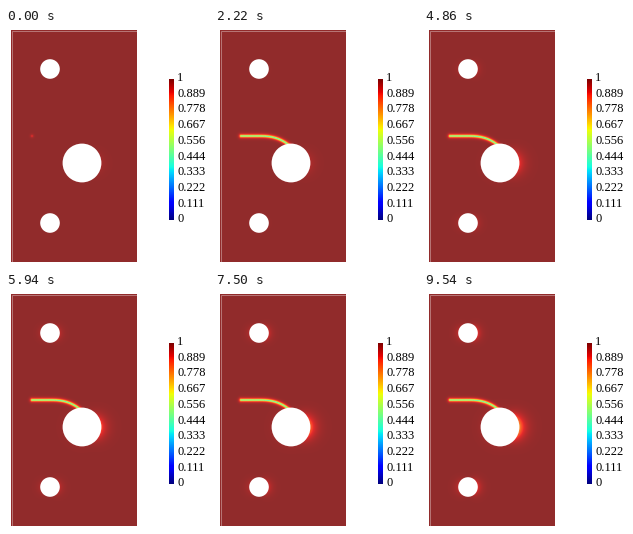
These frames come from a looping animation (203x236 px, 9600 ms). A matplotlib script:

```python
import numpy as np
import matplotlib.pyplot as plt
from matplotlib.animation import FuncAnimation
from matplotlib.patches import Circle, Rectangle

W, H, DPI = 203, 236, 64
STEP, LOOP = 60, 9600
SS = 3  # samples per pixel side
X0, X1, Y0, Y1 = 5, 131, 2, 234  # plate
HOLES = [(44, 41, 9.8), (76, 135, 19.4), (44, 195, 9.8)]
TIP, BEND, GOAL = 26, 44, (74.5, 117.5)  # crack start, bend and end
CRACK_Y = 108
CRACK_TIME, LOAD_START = 1140, 1740

jet = plt.get_cmap("jet", 512)
xs = X0 + (np.arange((X1 - X0) * SS) + .5) / SS
ys = Y0 + (np.arange((Y1 - Y0) * SS) + .5) / SS
gx, gy = np.meshgrid(xs, ys)


def crack_path(n=64):
    """Straight run that bends down into the big hole."""
    x = np.linspace(TIP, GOAL[0], n)
    u = np.clip((x - BEND) / (GOAL[0] - BEND), 0, 1)
    return x, CRACK_Y + (GOAL[1] - CRACK_Y) * u**2.6


px, py = crack_path()
box = (slice((98 - Y0) * SS, (124 - Y0) * SS), slice((18 - X0) * SS, (82 - X0) * SS))
bx, by = gx[box], gy[box]
near = np.minimum.accumulate([np.hypot(bx - x, by - y) for x, y in zip(px, py)])


def halo(hole, reach, power, back):
    """Damage around a hole, strongest on its right side."""
    cx, cy, r = hole
    rad = np.hypot(gx - cx, gy - cy)
    c = (gx - cx) / rad
    side = np.where(c > 0, 1, back) * np.abs(c)**power + .06
    return side * np.exp(-np.maximum(rad - r, 0) / reach)


small_halos = halo(HOLES[0], 3, 2, .5) + halo(HOLES[2], 3.4, 2, .5)
big_halo = halo(HOLES[1], 4.8, 4, 0)


def shade(t):
    grow = min(t / CRACK_TIME, 1)
    load = max(0, t - LOAD_START) / (LOOP - LOAD_START)
    d = (.02 + .20 * load) * big_halo + .085 * load * small_halos
    peak = .14 + .6 * min(grow * 6, 1)
    n = round(grow * (len(px) - 1))
    d[box] = np.maximum(d[box], peak * np.exp(-near[n] / .95))
    rgb = .8 * jet(1 - d)[..., :3] + .17  # lit surface looks paler than the bar
    return rgb.reshape(Y1 - Y0, SS, X1 - X0, SS, 3).mean(axis=(1, 3))


fig = plt.figure(figsize=(W / DPI, H / DPI), dpi=DPI, facecolor="white")
ax = fig.add_axes([0, 0, 1, 1])
ax.axis("off")
plate = ax.imshow(shade(0), extent=(X0, X1, Y1, Y0), interpolation="nearest")
ax.add_patch(Rectangle((X0 + .5, Y0 + .5), X1 - X0 - 1, Y1 - Y0 - 1, fill=False,
                       ec="white", alpha=.35, lw=72 / DPI, zorder=2))
bar = np.linspace(1, 0, 141)[:, None]
ax.imshow(bar, extent=(163, 168, 192, 51), cmap=jet, vmin=0, vmax=1,
          interpolation="nearest")
for cx, cy, r in HOLES:
    ax.add_patch(Circle((cx, cy), r, fc="white", ec="none", zorder=3))
for i in range(10):
    label = f"{i / 9:.3f}" if 0 < i < 9 else str(i // 9)
    ax.text(171, 194.3 - i * 15.7, label, family="Liberation Serif",
            fontsize=12.5 * 72 / DPI, va="baseline", color="black")
ax.set(xlim=(0, W), ylim=(H, 0))
ax.set_aspect("auto")


def update(k):
    t = k * STEP
    # the picture holds for 180 ms, then steps every 120 ms
    shown = 0 if t < 180 else 180 + (t - 180) // 120 * 120
    plate.set_data(shade(shown))
    return [plate]


anim = FuncAnimation(fig, update, frames=LOOP // STEP, interval=STEP,
                     repeat=True, repeat_delay=0)
plt.show()
```
